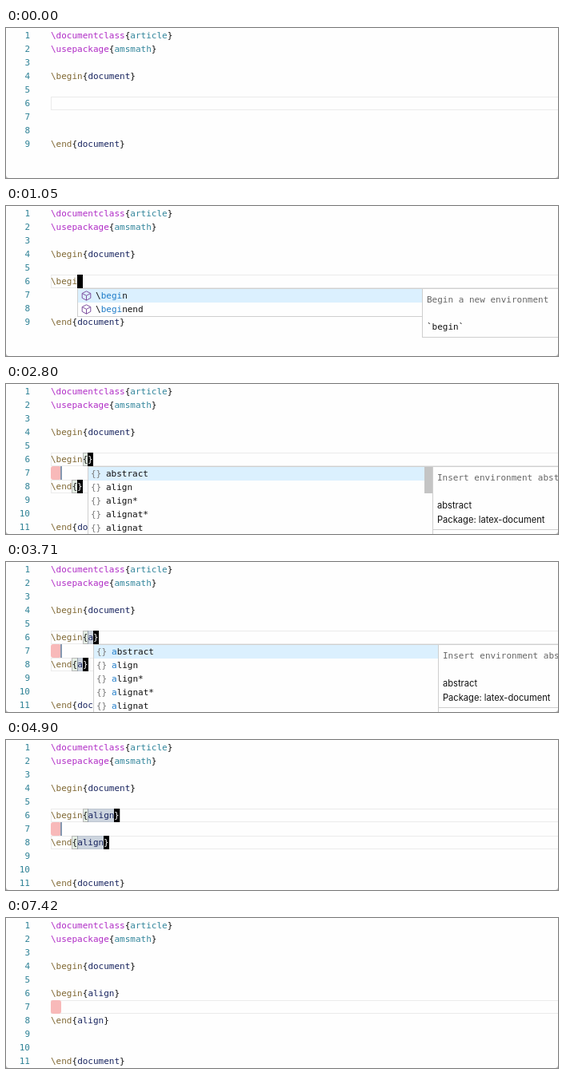
These frames come from a looping animation (690x188 px, 7.49 s). An HTML page:

```html
<!DOCTYPE html>
<html lang="en">
<head>
<meta charset="utf-8">
<title>LaTeX environment completion</title>
<style>
  html, body { margin: 0; width: 100%; height: 100%; overflow: hidden; background: #b4b4b4; }
  #stage {
    position: relative; width: 690px; height: 188px; overflow: hidden;
    background: #fefefe; border-radius: 0 0 4px 4px; color: #111;
    font: 11px/17px "DejaVu Sans Mono", "Liberation Mono", monospace;
  }
  #stage div, #stage svg { position: absolute; white-space: pre; box-sizing: border-box; }
  .num { left: 0; width: 30px; text-align: right; color: #2f8296; }
  .current { left: 56px; right: -2px; height: 17px; border: 1px solid #ebebeb; border-width: 1px 0 1px 1px; }
  .pre { color: #b02cc6; }
  .cmd { color: #7f6732; }
  .cls { color: #33869c; }
  .arg { color: #18245f; }
  .cursor { width: 7px; height: 17px; background: #000; color: #fff; }
  .bracket { height: 17px; border: 1px solid #b9b9b9; background: #0064001a; }
  .field { height: 17px; background: #0a326433; }
  .indent { left: 56px; width: 13px; height: 17px; background: #f8b9b9; border-radius: 3px; }
  .stop { left: 68px; width: 2px; height: 17px; background: #8598b1; }
  .list, .doc { top: 103px; background: #fefefe; border: 1px solid #cfcfcf; overflow: hidden; }
  .list { width: 432px; }
  .row { left: 0; width: 100%; height: 17px; padding-left: 22px; }
  .row.on { background: #dbf0fe; }
  .row b { font-weight: normal; color: #1f7cc8; }
  .row svg { left: 4px; top: 2px; }
  .row .braces { left: 3px; color: #777; }
  .bar { right: 0; top: 0; width: 10px; background: #c4c4c4; }
  .doc { width: 300px; }
  .doc .type { left: 5px; top: 5px; color: #666; }
  .doc .info { left: 5px; top: 39px; line-height: 18px; }
  .doc .sans { font-family: Inter, "Open Sans", sans-serif; font-size: 11.15px; }
</style>
</head>
<body>
<div id="stage"></div>
<script>
const LOOP = 7490, CHAR = 6.622, LEFT = 56;
const stage = document.getElementById('stage');
const colX = n => LEFT + n * CHAR;
const lineY = n => 17 * (n - 1) + 1;

const commands = ['\\begin', '\\beginend', '\\beta', '\\bezier{n}(x1,y1)(x2,y2)(x3,y3)', '\\breve'];
const environments = ['abstract', 'align', 'align*', 'alignat*', 'alignat', 'aligned'];

const docs = {
  '\\begin': { type: 'Begin a new environment', info: '`begin`', height: 62 },
  '\\beginend': {
    type: 'Insert \\begin/\\end', sans: true, height: 110,
    info: 'Insert a `\\begin{} / \\end{}` pair, if\nany. Autocompletion is automatic for\nthe environment name.'
  },
  abstract: {
    type: 'Insert environment abstract.', sans: true, height: 80,
    info: 'abstract\nPackage: latex-document'
  },
  align: { type: 'Insert environment align.', sans: true, info: 'align', height: 62 }
};

// [start ms, changes to the editor state]
const steps = [
  [0, { text: '', env: null, on: false, menu: false, pick: 0, done: false }],
  [70, { text: '\\', on: true, menu: true }],
  [560, { text: '\\b' }],
  [770, { text: '\\be' }],
  [910, { text: '\\beg' }],
  [1050, { text: '\\begi' }],
  [1190, { text: '\\begin' }],
  [1400, { pick: 1 }],
  [1680, { on: false }],
  [2100, { on: true }],
  [2660, { env: '', pick: 0 }],
  [3080, { on: false }],
  [3710, { env: 'a', on: true }],
  [3850, { env: 'al' }],
  [3990, { env: 'ali' }],
  [4690, { env: 'align', menu: false }],
  [5180, { on: false }],
  [5530, { done: true, on: true }],
  [6090, { on: false }],
  [6580, { on: true }],
  [7140, { on: false }]
];

const box = (cls, style, content = '') => `<div class="${cls}" style="${style}">${content}</div>`;

function colorize(text) {
  const preamble = /^\\(documentclass|usepackage)/.test(text);
  return text.replace(/(\\\w*)(?:\{([^}]*)\})?/, (_, cmd, arg) =>
    `<span class="${preamble ? 'pre' : 'cmd'}">${cmd}</span>` +
    (arg === undefined ? '' : `{<span class="${preamble ? 'cls' : 'arg'}">${arg}</span>}`));
}

function markMatch(label, query) {
  let next = 0;
  return [...label].map(c => c === query[next] ? (next++, `<b>${c}</b>`) : c).join('');
}

const cube = `<svg width="13" height="13" viewBox="0 0 13 13" fill="none" stroke="#7d4f9f">
  <path d="M6.5 .8 11.8 3.5V9.3L6.5 12.2 1.2 9.3V3.5ZM1.2 3.5 6.5 6.3 11.8 3.5M6.5 6.3V12.2"/></svg>`;

function popup(x, items, query, pick, icon, barHeight) {
  const rows = items.slice(0, 5).map((label, i) =>
    box(i === pick ? 'row on' : 'row', `top:${17 * i}px`, icon + markMatch(label, query))).join('');
  const height = items.length < 5 ? 17 * items.length + 2 : 110;
  const doc = docs[items[pick]];
  return box('list', `left:${x}px;height:${height}px`, rows + box('bar', `height:${barHeight}px`)) +
    box('doc', `left:${x + 431}px;height:${doc.height}px`,
      box('type', '', doc.type) + box(doc.sans ? 'info sans' : 'info', '', doc.info));
}

function cursor(line, col, on, char = ' ') {
  return on ? box('cursor', `left:${Math.round(colX(col))}px;top:${lineY(line)}px`, char) : '';
}

// Linked edit inside the braces of \begin or \end
function linkedField(line, open, env) {
  const top = `top:${lineY(line)}px`;
  const end = open + 1 + env.length;
  const bracket = col => box('bracket', `left:${colX(col)}px;${top};width:${CHAR + .5}px`);
  return bracket(open) + bracket(end) +
    box('field', `left:${colX(open + 1)}px;${top};width:${env.length * CHAR}px`);
}

function render(s) {
  const inserted = s.env !== null;
  const lines = ['\\documentclass{article}', '\\usepackage{amsmath}', '', '\\begin{document}', '',
    ...(inserted ? [`\\begin{${s.env}}`, '', `\\end{${s.env}}`] : [s.text, '']),
    ...(inserted ? ['', ''] : ['']), '\\end{document}'];
  const editing = inserted && !s.done;
  let html = box('current', `top:${lineY(s.done ? 7 : 6)}px`);

  if (inserted) html += box('indent', `top:${lineY(7)}px`);
  if (editing) {
    html += box('current', `top:${lineY(8)}px`) + box('stop', `top:${lineY(7)}px`) +
      linkedField(6, 6, s.env) + linkedField(8, 4, s.env);
  }
  lines.forEach((text, i) => {
    const top = `top:${lineY(i + 1)}px`;
    html += box('num', top, i + 1) + box('', `left:${LEFT}px;${top}`, colorize(text));
  });

  const col = inserted ? 7 + s.env.length : s.text.length;
  if (s.done) html += cursor(7, 2, s.on);
  else if (editing) html += cursor(6, col, s.on, '}') + cursor(8, col - 2, s.on, '}');
  else html += cursor(6, col, s.on);

  if (s.menu) {
    const x = Math.round(colX(col));
    if (inserted) {
      const items = environments.filter(name => name.startsWith(s.env));
      html += popup(x, items, s.env, s.pick, '<div class="braces">{}</div>', s.env ? 0 : 33);
    } else {
      const query = s.text.slice(1);
      const narrowed = query.length > 2;
      html += popup(x, narrowed ? commands.slice(0, 2) : commands, query, s.pick, cube, narrowed ? 0 : 110);
    }
  }
  stage.innerHTML = html;
}

const start = performance.now();
let shown = -1;

function tick() {
  const time = Math.max(0, performance.now() - start) % LOOP;
  const index = steps.findLastIndex(([at]) => at <= time);
  if (index !== shown) {
    shown = index;
    render(Object.assign({}, ...steps.slice(0, index + 1).map(step => step[1])));
  }
  requestAnimationFrame(tick);
}
tick();
</script>
</body>
</html>
```
